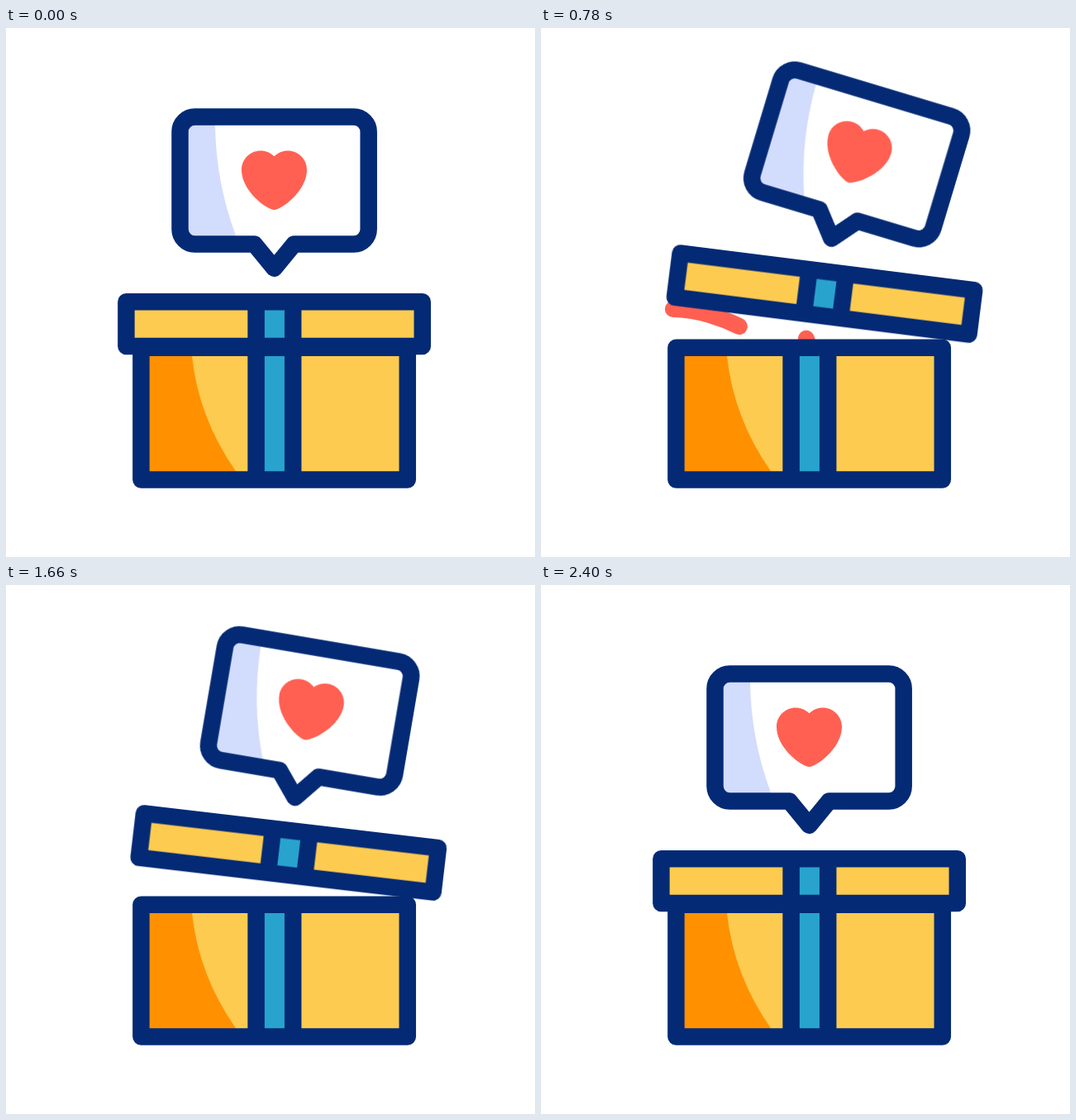
An HTML page that plays this animation: 640x640 px, repeating every 2420 ms.

```html
<!DOCTYPE html>
<html lang="en">
<head>
<meta charset="utf-8">
<title>Gift box</title>
<style>
  html, body { margin: 0; width: 100%; height: 100%; overflow: hidden; background: #fff; }
  svg { display: block; width: 100vw; height: 100vh; }

  .line { fill: none; stroke: #042a75; stroke-width: 20.5; stroke-linejoin: round; stroke-linecap: round; }
  .gold { fill: #fdcb50; }
  .teal { fill: #28a3ce; }
  .shade { fill: #ff9100; }
  .tint { fill: #d2dcfd; }
  .heart { fill: #ff6052; }
  .ribbon { fill: none; stroke: #ff6052; stroke-width: 20; stroke-linecap: round; opacity: 0; }

  .lid, .bubble, .ribbon { animation: 2420ms infinite; }
  .lid, .bubble { animation-timing-function: cubic-bezier(.3333, 0, .6667, 1); }
  .lid { transform-origin: 324.6px 358.2px; animation-name: lift; }
  .bubble { transform-origin: 324.5px 290.7px; animation-name: swing; }
  .ribbon { animation-timing-function: linear; }
  .long { animation-name: fly-long; }
  .short { animation-name: fly-short; }

  @keyframes lift {
    0%, 99.174%, 100% { transform: translate(0, 0) rotate(0deg); }
    49.587% { transform: translate(25.7px, -50.9px) rotate(10deg); }
  }
  @keyframes swing {
    0%, 99.174%, 100% { transform: rotate(0deg); }
    24.793% { transform: rotate(15deg); }
    49.587% { transform: rotate(-10deg); }
    74.38% { transform: rotate(5deg); }
  }
  /* dash length is the visible piece, offset is its tail */
  @keyframes fly-long {
    0%, 23.14% { opacity: 0; stroke-dasharray: 0 600; stroke-dashoffset: 0; }
    23.15% { opacity: 1; stroke-dasharray: 0 600; stroke-dashoffset: 0; }
    32.23% { opacity: 1; stroke-dasharray: 83.5 600; stroke-dashoffset: -64; }
    44.63% { opacity: 1; stroke-dasharray: 57 600; stroke-dashoffset: -180; }
    51.23% { opacity: 1; stroke-dasharray: .1 600; stroke-dashoffset: -252; }
    51.24%, 100% { opacity: 0; stroke-dasharray: .1 600; stroke-dashoffset: -252; }
  }
  @keyframes fly-short {
    0%, 26.44% { opacity: 0; stroke-dasharray: 0 600; stroke-dashoffset: 0; }
    26.45% { opacity: 1; stroke-dasharray: 0 600; stroke-dashoffset: 0; }
    32.23% { opacity: 1; stroke-dasharray: 46 600; stroke-dashoffset: 0; }
    44.63% { opacity: 1; stroke-dasharray: 75 600; stroke-dashoffset: -120; }
    52.06% { opacity: 1; stroke-dasharray: .1 600; stroke-dashoffset: -208; }
    52.07%, 100% { opacity: 0; stroke-dasharray: .1 600; stroke-dashoffset: -208; }
  }
</style>
</head>
<body>
<svg viewBox="0 0 640 640">
  <path class="ribbon long" d="M290 400C275 378 258 370 240 361S190 340 160 340S85 355 64 380"/>
  <path class="ribbon short" d="M335 420C332 400 325 390 321 376C312 350 285 345 255 356S200 372 170 358"/>

  <g class="box">
    <path class="gold" d="M163.4 386.7H485.8V546.4H163.4Z"/>
    <path class="shade" d="M163.4 386.7H224.2L225 396.8Q233 472 278 536.2L285 546.4H163.4Z"/>
    <path class="teal" d="M302.6 386.7H347.2V546.4H302.6Z"/>
    <path class="line" d="M163.4 386.7H485.8V546.4H163.4ZM302.6 386.7V546.4M347.2 386.7V546.4"/>
  </g>

  <g class="lid">
    <path class="gold" d="M145.4 331.3H503.8V385.1H145.4Z"/>
    <path class="teal" d="M302.6 331.3H347.2V385.1H302.6Z"/>
    <path class="line" d="M145.4 331.3H503.8V385.1H145.4ZM302.6 331.3V385.1M347.2 331.3V385.1"/>

    <g class="bubble">
      <path fill="#fff" d="M228.5 107.5H420.7a18 18 0 0 1 18 18V243.5a18 18 0 0 1-18 18H348.5L324.5 290.7L300.5 261.5H228.5a18 18 0 0 1-18-18V125.5a18 18 0 0 1 18-18Z"/>
      <path class="tint" d="M228.5 107.5H252.8L253 118Q254 187 278 251L282 261.5H228.5a18 18 0 0 1-18-18V125.5a18 18 0 0 1 18-18Z"/>
      <path class="line" d="M228.5 107.5H420.7a18 18 0 0 1 18 18V243.5a18 18 0 0 1-18 18H348.5L324.5 290.7L300.5 261.5H228.5a18 18 0 0 1-18-18V125.5a18 18 0 0 1 18-18Z"/>
      <path class="heart" d="M324.5 155.3C320 151 314.5 148.5 308 148.5C295.300 148.500 285 158.800 285 171.500C285 192 304.500 212 321 219.300Q324.500 220.800 328 219.300C344.500 212 364 192 364 171.500C364 158.800 353.700 148.500 341 148.500C334.500 148.500 329 151 324.500 155.300Z"/>
    </g>
  </g>
</svg>
</body>
</html>
```
